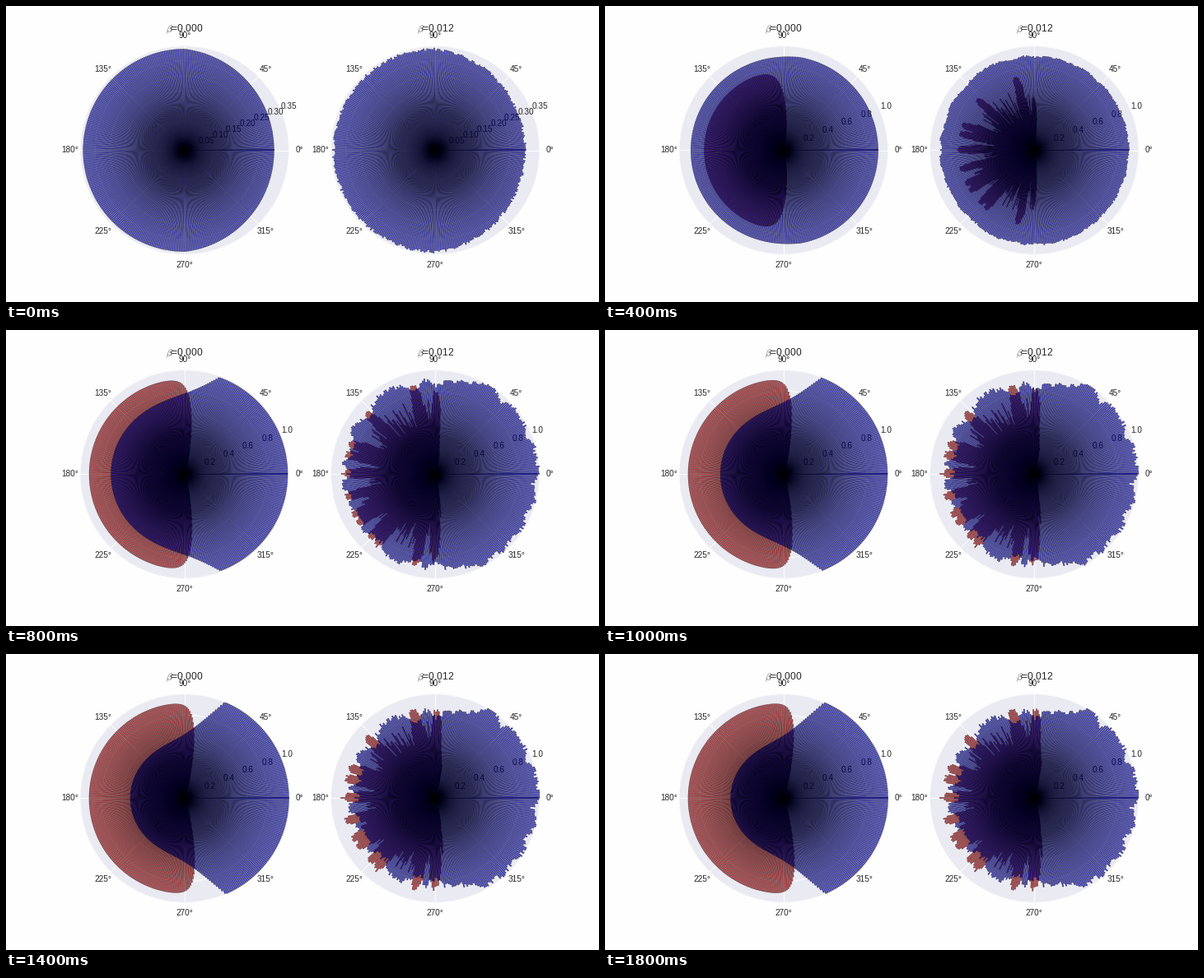
A matplotlib script for the animation above (1.9 s loop, 720 px wide and 360 px high).

```python
import numpy as np
import matplotlib.pyplot as plt
from matplotlib.animation import FuncAnimation
from matplotlib.collections import PolyCollection
from matplotlib.patches import Circle

plt.rcParams["font.family"] = "Liberation Sans"
plt.rcParams["mathtext.fontset"] = "cm"

W, H, FRAMES, STEP_MS = 720, 360, 19, 100
RADIUS, CY = 126.8, 175.5
PAPER, INK, PANEL = "#FDFEFD", "#262626", "#EAEAF2"

# Narrow bars leave light gaps; the last bar covers the first one.
BARS, BAR_WIDTH = 360, 0.6
DEG = np.linspace(0, 360, BARS)
FOLD = np.abs((DEG + 180) % 360 - 180)

# Angles where the noisy network keeps its red activity, and where blue is weak.
LOBES = [88, 104, 138, 160, 167, 179, 194, 206, 212, 224, 230, 257, 270]
DIPS = [22, 48, 306, 320, 335, 354]


def bumps(centres, width, power=2):
    gap = (DEG[:, None] - np.array(centres) + 180) % 360 - 180
    return np.exp(-np.abs(gap / width) ** power).max(axis=1)


rng = np.random.default_rng(12)
jitter = np.clip(rng.normal(size=BARS), -1.6, 1.6)
lobe = bumps(LOBES, 4, 4)
open_gap = 1 - bumps(LOBES, 9)
dip = bumps(DIPS, 3.5)
back = 1 / (1 + np.exp(-(FOLD - 86) / 2))


def onset(x, power):
    """Rise from 0 to 1 with a soft start."""
    return 1 - np.exp(-max(x, 0) ** power)


def blue_profile(n, drop, shift=0):
    """High plateau in front that falls off to a lower level behind."""
    front = 1 - 0.7 * np.exp(-n / 2)
    rear = 1 - 0.66 * np.exp(-n / 2) - drop * onset((n - 3) / 5.47, 1.8)
    if front < rear:
        weight = np.maximum(np.cos(np.radians(FOLD)), 0)
    else:
        edge = 66.5 + 13.5 * np.exp(-(n - 4) / 3) - shift
        weight = np.exp(-np.maximum(FOLD - edge, 0) / 14)
    return rear + (front - rear) * weight


def red_profile(n):
    level = 0.914 * onset(n / 3, 2)
    edge = 78 + 20 * np.exp(-n / 4.5)
    soft = 3 + 3 * np.exp(-n / 4)
    return level / (1 + np.exp(-(FOLD - edge) / soft))


def clean(n):
    return red_profile(n), blue_profile(n, 0.495)


def noisy(n):
    grow = onset(n / 7, 3)
    grain = (0.003 + 0.013 * grow) * jitter
    cut = (0.24 + 0.26 * np.exp(-n / 5)) * (1 - lobe) * (1 + 0.35 * jitter)
    red = red_profile(n) * (0.965 - cut + grain)
    blue = blue_profile(n, 0.2, 8 * grow) + grain
    blue += grow * (back * (0.08 * open_gap - 0.05 * lobe) - 0.05 * dip - 0.01)
    return red, blue


def add_bars(ax, cx, r, color, z):
    def point(radius, deg):
        t = np.radians(deg)
        return np.column_stack([cx + radius * np.cos(t), CY - radius * np.sin(t)])

    wedges = np.stack([point(0 * r, DEG), point(r, DEG), point(r, DEG + BAR_WIDTH)], axis=1)
    ax.add_collection(PolyCollection(wedges, facecolor=color, edgecolor="black",
                                     linewidth=0.5, alpha=0.7, zorder=z), autolim=False)


def add_grid(ax, cx, step, count):
    disc = Circle((cx, CY), RADIUS, fc=PANEL, ec="none", zorder=0)
    ax.add_patch(disc)
    for deg in range(0, 360, 45):
        c, s = RADIUS * np.cos(np.radians(deg)), RADIUS * np.sin(np.radians(deg))
        ax.plot([cx, cx + c], [CY, CY - s], color="white", lw=1, zorder=1)
        ax.text(cx + 1.1 * c, CY - 1.1 * s, f"{deg}°",
                size=10, color=INK, ha="center", va="center")
    digits = 2 if step < 0.1 else 1
    for k in range(1, count + 1):
        r = RADIUS * k / count
        ring = Circle((cx, CY), r, fc="none", ec="white", lw=1, zorder=1)
        ax.add_patch(ring)
        ring.set_clip_path(disc)
        ax.text(cx + r * np.cos(np.pi / 8), CY - r * np.sin(np.pi / 8),
                f"{k * step:.{digits}f}", size=10, color=INK,
                ha="left", va="bottom", zorder=1.5)


def add_panel(ax, cx, beta, red, blue):
    red, blue = np.clip(red, 0, 1), np.clip(blue, 0, 1)
    top = max(red.max(), blue.max())
    step = 0.05 if top <= 0.45 else 0.1 if top <= 0.9 else 0.2
    count = int(np.ceil(top / step - 1e-9))
    scale = RADIUS / (count * step)
    add_grid(ax, cx, step, count)
    add_bars(ax, cx, red * scale, "red", 2)
    add_bars(ax, cx, blue * scale, "blue", 2.5)
    ax.text(cx, 31, rf"$\beta$={beta:.3f}", size=12, color=INK, ha="center", va="baseline")


fig = plt.figure(figsize=(W / 72, H / 72), dpi=72, facecolor=PAPER)
ax = fig.add_axes([0, 0, 1, 1])


def draw(n):
    ax.clear()
    ax.set_xlim(0, W)
    ax.set_ylim(H, 0)
    ax.axis("off")
    add_panel(ax, 216.8, 0, *clean(n))
    add_panel(ax, 521.2, 0.012, *noisy(n))
    return []


anim = FuncAnimation(fig, draw, frames=FRAMES, interval=STEP_MS, repeat=True, repeat_delay=0)
plt.show()
```
